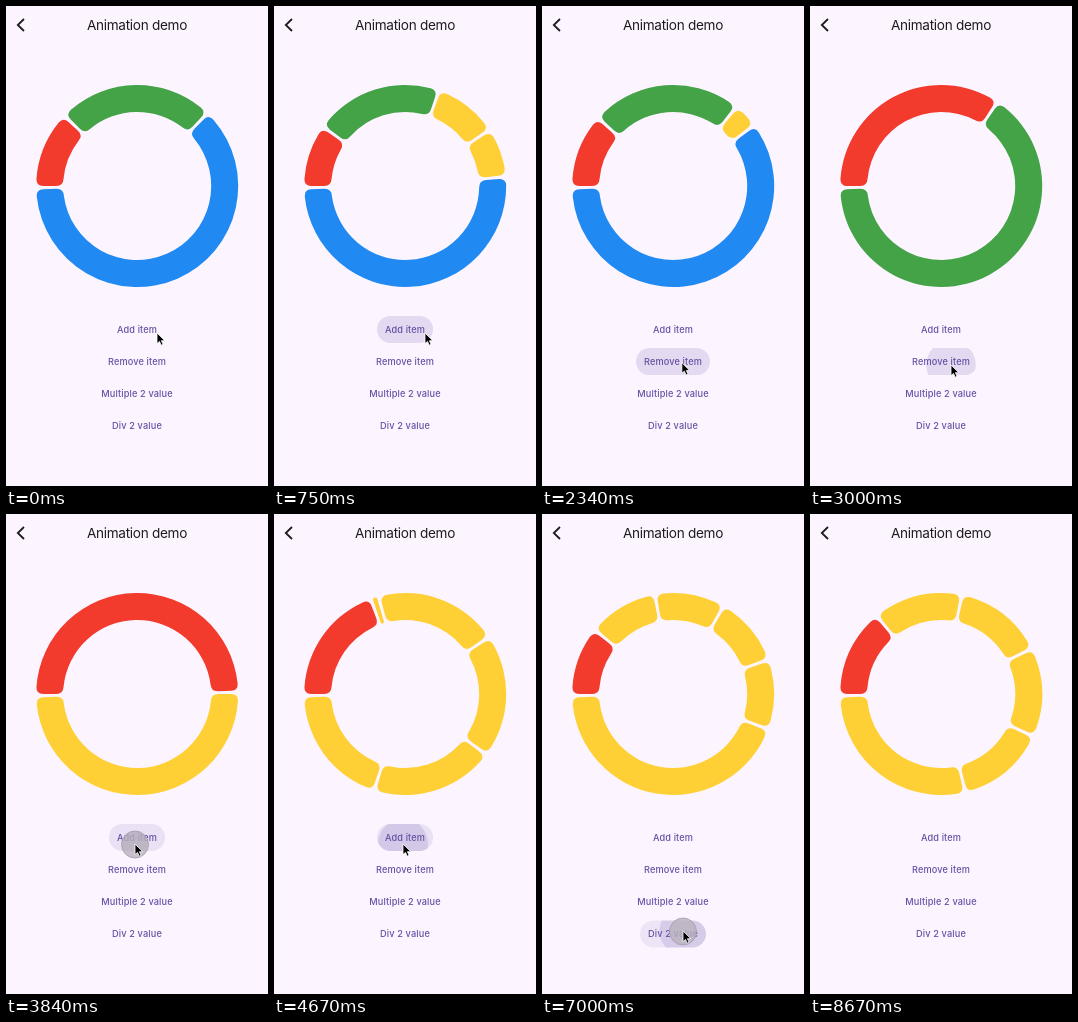
An HTML page for the animation above (8750 ms loop, 262 by 480 pixels).

```html
<!DOCTYPE html>
<html lang="en">
<head>
<meta charset="utf-8">
<title>Animation demo</title>
<style>
  html, body { margin: 0; width: 100%; height: 100%; overflow: hidden; background: #fcf5ff; }
  svg { display: block; width: 100%; height: 100%; }
  text { font-family: Inter, Roboto, sans-serif; text-anchor: middle; }
  .title { font-size: 13.6px; letter-spacing: -.3px; fill: #1d1b20; }
  .label { font-size: 9.2px; font-weight: 500; letter-spacing: .13px; fill: #6750a4; }
</style>
</head>
<body>
<svg viewBox="0 0 262 480">
  <defs id="clips"></defs>
  <path d="M18 13L11.8 19L18 25" fill="none" stroke="#1d1b20" stroke-width="1.8"/>
  <text class="title" x="131" y="24">Animation demo</text>
  <g id="ring"></g>
  <g id="ripples" fill="#6750a4"></g>
  <g id="labels"></g>
  <circle id="touch" r="13.5" fill="#b9b2bd" fill-opacity=".8" stroke="#a39ca8" stroke-width=".8"/>
  <path id="cursor" d="M0 0V10.6L2.5 8.4L4.2 12.2L6.1 11.3L4.4 7.7H7.8Z" fill="#000" stroke="#fff" stroke-width=".8"/>
</svg>
<script>
const LOOP = 8750, FPS = 12, TWEEN = 260, PRESS = 85;
const CX = 131.2, CY = 180, OUTER = 101, INNER = 74, GAP = 2 * Math.PI / 180;
const RED = '#f23a2d', GREEN = '#43a346', BLUE = '#2189f2', YELLOW = '#ffd035';

// Clockwise from nine o'clock: colour, starting value, then [tap time, new value] steps.
const items = [
  [RED, 1],
  [GREEN, 2, [2985, 0]],
  [YELLOW, 0, [250, 1], [1850, 0]],
  [YELLOW, 0, [550, 1], [1557, 0]],
  [YELLOW, 0, [850, 1], [2160, 0]],
  [BLUE, 5, [2540, 0]],
  [YELLOW, 0, [4650, 1]],
  [YELLOW, 0, [4400, 1]],
  [YELLOW, 0, [4150, 1]],
  [YELLOW, 0, [3890, 1]],
  [YELLOW, 0, [3560, 1], [5040, 2], [5310, 4], [5573, 8], [6700, 4], [6985 + 7, 2]]
].map(([color, start, ...steps]) => ({ color, start, steps }));

const taps = items.flatMap(item => item.steps.map(step => step[0])).sort((a, b) => a - b);

// Pointer path: time, x, y.
const pointer = [
  [0, 151, 327], [950, 151, 327], [1380, 139, 355], [2160, 139, 355],
  [2540, 141, 359], [3080, 141, 359], [3420, 129, 330], [4700, 129, 330],
  [4920, 142, 384], [5850, 142, 384], [6420, 141, 417], [8100, 141, 417]
];

// Label and pill width, 32 px apart.
const buttons = [['Add item', 56], ['Remove item', 74], ['Multiple 2 value', 88], ['Div 2 value', 66]];

const $ = id => document.getElementById(id);
const clamp = x => Math.min(1, Math.max(0, x));

function add(parent, tag, attrs) {
  const el = document.createElementNS('http://www.w3.org/2000/svg', tag);
  for (const key in attrs) el.setAttribute(key, attrs[key]);
  return parent.appendChild(el);
}

function valueAt(item, t) {
  return item.steps.reduce((v, [at, to]) => v + (to - v) * clamp((t - at) / TWEEN), item.start);
}

function pointerAt(t) {
  const i = pointer.findIndex(key => key[0] > t);
  if (i < 0) return pointer[pointer.length - 1].slice(1);
  const [t0, x0, y0] = pointer[i - 1], [t1, x1, y1] = pointer[i];
  const p = (t - t0) / (t1 - t0), e = p * p * (3 - 2 * p);
  return [x0 + (x1 - x0) * e, y0 + (y1 - y0) * e];
}

function segment(from, to) {
  const sweep = to - from;
  if (sweep <= 0) return '';
  const c = Math.min(7, sweep * INNER / 2);
  const o = c / OUTER, n = c / INNER;
  const at = (r, a) => `${(CX - r * Math.cos(a)).toFixed(2)} ${(CY - r * Math.sin(a)).toFixed(2)}`;
  const large = trim => +(sweep - 2 * trim > Math.PI);
  return `M${at(OUTER - c, from)}Q${at(OUTER, from)} ${at(OUTER, from + o)}` +
    `A${OUTER} ${OUTER} 0 ${large(o)} 1 ${at(OUTER, to - o)}` +
    `Q${at(OUTER, to)} ${at(OUTER - c, to)}L${at(INNER + c, to)}` +
    `Q${at(INNER, to)} ${at(INNER, to - n)}` +
    `A${INNER} ${INNER} 0 ${large(n)} 0 ${at(INNER, from + n)}` +
    `Q${at(INNER, from)} ${at(INNER + c, from)}Z`;
}

buttons.forEach(([label, width], i) => {
  const y = 323.4 + i * 32.2;
  const clip = add($('clips'), 'clipPath', { id: 'pill' + i });
  add(clip, 'rect', { x: 131 - width / 2, y: y - 13.5, width, height: 27, rx: 13.5 });
  add($('labels'), 'text', { class: 'label', x: 131, y: y + 3.2 }).textContent = label;
});

const arcs = items.map(item => add($('ring'), 'path', { fill: item.color }));
const ripples = taps.map(at => {
  const [cx, cy] = pointerAt(at);
  const pill = add($('ripples'), 'g', { 'clip-path': `url(#pill${Math.round((cy - 327) / 32)})` });
  return { at, el: add(pill, 'circle', { cx, cy }) };
});

function draw(t) {
  const values = items.map(item => valueAt(item, t));
  const unit = 2 * Math.PI / values.reduce((a, b) => a + b);
  let angle = 0;
  values.forEach((v, i) => {
    arcs[i].setAttribute('d', segment(angle, angle + v * unit - GAP));
    angle += v * unit;
  });

  for (const { at, el } of ripples) {
    const age = t - at;
    el.setAttribute('r', 8 + 72 * clamp((age + PRESS) / 430));
    el.setAttribute('opacity', age < -PRESS ? 0 : .17 * (1 - clamp((age - 200) / 240)));
  }

  const [x, y] = pointerAt(t);
  const pressed = taps.some(at => t >= at - PRESS && t < at + 9);
  $('touch').setAttribute('transform', `translate(${x} ${y + .5})`);
  $('touch').setAttribute('visibility', pressed ? 'visible' : 'hidden');
  $('cursor').setAttribute('transform', `translate(${x} ${y})`);
  $('cursor').setAttribute('visibility', t < 8100 ? 'visible' : 'hidden');
}

const begin = performance.now();
function tick() {
  const t = (performance.now() - begin) % LOOP;
  draw(Math.floor(t * FPS / 1000 + .02) * 1000 / FPS);
  requestAnimationFrame(tick);
}
tick();
</script>
</body>
</html>
```
